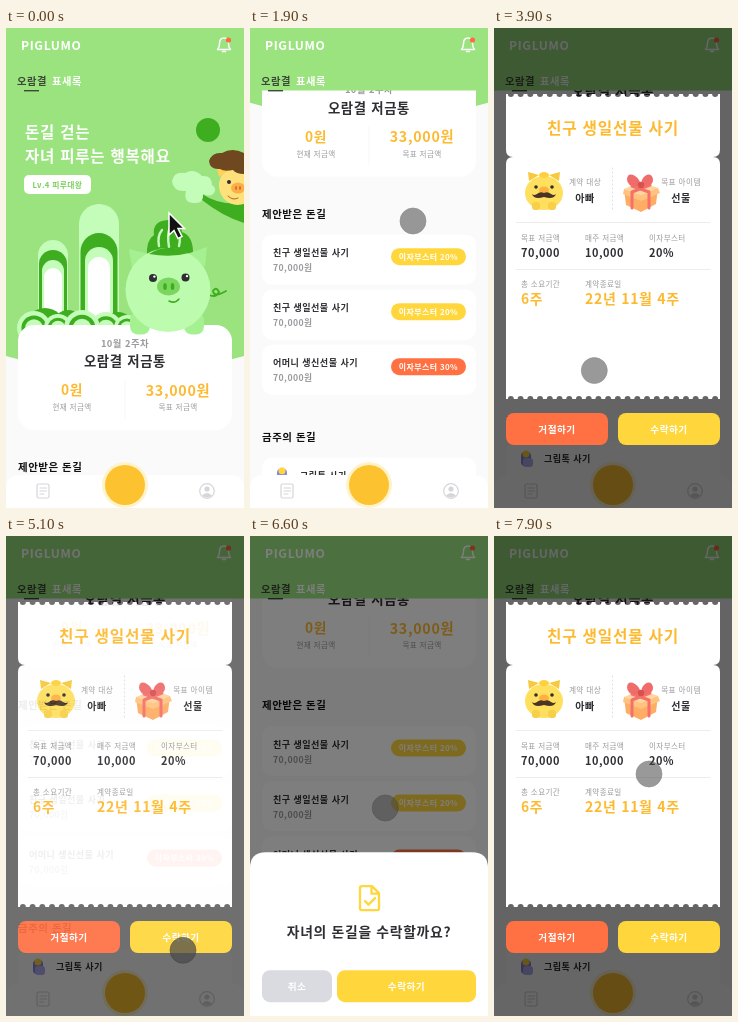
These frames come from a looping animation (238x480 px, 8000 ms). An HTML page:

```html
<!DOCTYPE html>
<html lang="ko">
<head>
<meta charset="utf-8">
<title>저금통</title>
<style>
  html, body { margin: 0; width: 100%; height: 100%; overflow: hidden; background: #fafafb; }
  svg { display: block; width: 100vw; height: 100vh; }
  text { font-family: "Noto Sans CJK KR", "Noto Sans CJK", "Noto Sans", sans-serif; letter-spacing: .05em; }
</style>
</head>
<body>
<svg id="stage" viewBox="0 0 238 480"></svg>
<script>
const LOOP = 8000;
const GREEN = '#9ae37f', DARK = '#3eae20', MINT = '#c4fdb9', YELLOW = '#ffd73c',
      GOLD = '#fdba30', ORANGE = '#ff7043', INK = '#2e2e33', GRAY = '#9a9a9e', ICON = '#d6d6da';

// ---- drawing helpers; text is placed by its vertical centre ----
const text = (x, y, size, fill, str, anchor = 'start', weight = 700) =>
  `<text x="${x}" y="${y + .4 + size * .34}" font-size="${size * .935}" fill="${fill}" text-anchor="${anchor}" font-weight="${weight}">${str}</text>`;
const mid = (x, y, size, fill, str, weight) => text(x, y, size, fill, str, 'middle', weight);
const rect = (x, y, w, h, r, fill) =>
  `<rect x="${x}" y="${y}" width="${w}" height="${h}" rx="${r}" fill="${fill}"/>`;
const oval = (x, y, rx, ry, fill, turn = 0) =>
  `<ellipse cx="${x}" cy="${y}" rx="${rx}" ry="${ry}" fill="${fill}" transform="rotate(${turn} ${x} ${y})"/>`;
const dot = (x, y, r, fill) => oval(x, y, r, r, fill);
const shape = (d, fill) => `<path d="${d}" fill="${fill}"/>`;
const line = (d, stroke, width = 1, extra = '') =>
  `<path d="${d}" fill="none" stroke="${stroke}" stroke-width="${width}" stroke-linecap="round" stroke-linejoin="round" ${extra}/>`;
const arch = (cx, top, half, fill) =>
  shape(`M${cx - half} 302V${top + half}a${half} ${half} 0 0 1 ${2 * half} 0V302z`, fill);
const group = (id, body) => `<g id="${id}">${body}</g>`;

function mound(x, r) {
  return dot(x, 300, r, MINT) + dot(x, 300, r * .74, DARK) + dot(x, 300, r * .52, MINT);
}

function scenery() {
  return arch(47, 212, 15, MINT) + arch(47, 222, 14, DARK) + arch(47, 232, 11, MINT) + arch(47, 240, 9, '#fff')
    + arch(93, 176, 20, MINT) + arch(93, 205, 18.5, DARK) + arch(93, 219, 14, MINT) + arch(93, 229, 11, '#fff')
    + dot(39, 300, 20, DARK) + dot(62, 296, 14, DARK) + dot(112, 300, 16, DARK)
    + mound(28, 17) + mound(52, 14) + mound(100, 16) + mound(121, 13) + mound(76, 18);
}

function visitor() {
  return shape('M196 166Q214 178 238 175V195Q216 188 196 172z', DARK)
    + dot(202, 102, 12, DARK)
    + shape('M166 153q2-10 13-8q9-5 17 3q10-1 10 9q6 4 1 9q-3 3-10 0q1 10-9 9q-11 0-8-12q-13 1-14-10z', MINT)
    + oval(231, 158, 18, 19, '#ffe17c', -12)
    + shape('M213 149l-3-12l12 6z', '#ffd05a')
    + shape('M203 133q3-9 13-8q10-6 22 0V146q-8 0-11-4q-9 2-13-1q-10 1-11-8z', '#70481f')
    + dot(223, 154, 2, INK) + oval(232, 160, 7, 5.5, '#ffad4a')
    + oval(230, 160, 1, 2, '#c87522') + oval(234, 160, 1, 2, '#c87522')
    + line('M222 168q5 5 10 2', '#a86725');
}

function pig() {
  return line('M203 267q7 3 10-3q-3-6-6-1q1 7 13 0', DARK, 1.8)
    + shape('M141 228q-1-16 7-21q-2-14 14-15q13 0 14 12q12 4 11 24z', DARK)
    + line('M153 218q-2-10 3-16M163 219q-2-12 1-20M173 218q2-8-1-14', MINT, 2.4)
    + rect(124, 284, 20, 22.500, 8, '#a5f091') + rect(178, 284, 20, 22.500, 8, '#a5f091')
    + shape('M126 240l-3-19l20 5zM199 239l2-20l-20 7z', '#a5f091')
    + oval(162, 262, 42.5, 42, '#bdfbae')
    + shape('M143 226q19-12 40-1q-18 5-40 1z', DARK)
    + dot(147, 250, 4, INK) + dot(179.5, 249.5, 4, INK)
    + dot(148.4, 248.6, 1.2, '#fff') + dot(181, 248.1, 1.2, '#fff')
    + oval(162.5, 258.5, 11.5, 9, '#7bd660')
    + oval(159, 258.5, 1.8, 3.6, DARK) + oval(166.5, 258.5, 1.8, 3.6, DARK)
    + line('M163 273q6 3 10-2', DARK, 1.5);
}

function offer(top, name, rate, color) {
  return rect(12, top, 214, 50, 10, '#fff')
    + text(23, top + 18, 9.7, INK, name) + text(23, top + 33, 9.3, GRAY, '70,000원')
    + rect(141, top + 13.5, 75, 17, 8.5, color) + mid(178.5, top + 22, 8.5, '#fff', `이자부스터 ${rate}%`);
}

function page() {
  return shape('M0 0H238V328Q119 362 0 328z', GREEN)
    + text(19, 104, 16.6, '#fff', '돈길 걷는') + text(19, 128, 16.6, '#fff', '자녀 피루는 행복해요')
    + rect(18, 147, 67, 19, 5, '#fff') + mid(51.5, 156.5, 8.3, '#79cf5b', 'Lv.4 피루대왕')
    + scenery() + visitor()
    + rect(12, 297, 214, 105, 16, '#fff') + pig()
    + mid(119, 315, 10, GRAY, '10월 2주차') + mid(119, 333, 14.3, INK, '오람결 저금통')
    + line('M119 352V390', '#f7f7f9')
    + mid(66, 362, 14.7, GOLD, '0원') + mid(172, 362, 15.2, GOLD, '33,000원')
    + mid(66, 379, 8.1, GRAY, '현재 저금액', 400) + mid(172, 379, 8.1, GRAY, '목표 저금액', 400)
    + text(12, 439, 11.2, '#111', '제안받은 돈길')
    + offer(460, '친구 생일선물 사기', 20, YELLOW)
    + offer(515, '친구 생일선물 사기', 20, YELLOW)
    + offer(570, '어머니 생신선물 사기', 30, ORANGE)
    + text(12, 662, 11.2, '#111', '금주의 돈길')
    + rect(12, 683, 214, 90, 10, '#fff')
    + rect(27, 694, 10, 14, 4, '#8a83df') + rect(29, 700, 10, 9, 3, '#b3adf2')
    + dot(32, 696, 3.5, YELLOW) + text(50, 700.5, 9.7, INK, '그립톡 사기');
}

function header() {
  return rect(0, 0, 238, 62.5, 0, GREEN)
    + text(15, 17, 13, '#fff', 'PIGLUMO')
    + line('M211.5 21.5h13q-2-2-2-6q0-5.500-4.500-5.500t-4.500 5.500q0 4-2 6zM216.500 23.500h3', '#fff', 1.5)
    + dot(222.5, 12, 2.6, '#ff6a45')
    + text(11, 52.5, 11, '#3c4a37', '오람결') + text(46, 52.5, 11, '#fff', '표새록')
    + rect(18, 62, 15, 1.4, 0, '#3c4a37');
}

function tabs() {
  return shape('M0 480V461q0-14 14-14H224q14 0 14 14V480z', '#fff')
    + line('M32.500 456h9q1.500 0 1.500 1.500v11q0 1.500-1.500 1.500h-9q-1.500 0-1.500-1.500v-11q0-1.500 1.500-1.500zM34 460h6.500M34 463h6.500M34 466h4', ICON, 1.2)
    + `<circle cx="201" cy="463" r="7.300" fill="none" stroke="${ICON}" stroke-width="1.200"/>`
    + dot(201, 461, 2.6, ICON) + shape('M196 467.500q5-5 10 0q-5 4-10 0z', ICON)
    + dot(119, 457, 23, '#fff3c9') + dot(119, 457, 20, '#fdc22f');
}

function dadPig() {
  return shape('M35 153l-1-9l11 3zM65 153l1-9l-11 3z', '#f7c93e')
    + oval(50, 165, 19, 17, '#ffe05e') + rect(38, 174, 8, 8, 3, '#f7cf48') + rect(54, 174, 8, 8, 3, '#f7cf48')
    + oval(50, 147, 5, 3, '#ffd03e')
    + dot(42, 159, 1.8, INK) + dot(58, 159, 1.8, INK) + oval(50, 162, 5, 3.5, '#ffb041')
    + shape('M50 165q-4-2-7 1q-3 2-5 0q2 6 12 3q10 3 12-3q-2 2-5 0q-3-3-7-1z', '#4a3524');
}

function gift() {
  return shape('M130 161l17 6v17l-15-7zM164 160l-17 7v17l15-8z', '#ffad64')
    + shape('M147 167l17-7l2 5l-19 8l-18-7l1-5z', '#ffc37f')
    + shape('M130 161l17-7l17 6l-17 7z', '#ffd49d')
    + line('M138 158l17 6v16M156 157l-18 7v16', '#f4716b', 3)
    + shape('M147 158q-14 2-14-7q1-7 8-3q5 3 6 10zM147 158q13 1 12-7q-2-7-8-3q-4 3-4 10z', '#ef6c6b')
    + dot(147, 157, 3.2, '#d9514f');
}

function contract() {
  const teeth = 22, gap = 214 / teeth - 6;
  const edge = (dir, sweep) => `h${dir * gap / 2}a3 3 0 0 ${sweep} ${dir * 6} 0h${dir * gap / 2}`.repeat(teeth);
  const field = (x, y, label, value, size = 11.7, color = INK) =>
    text(x, y, 8.1, GRAY, label, 'start', 400) + text(x, y + 15, size, color, value);
  return shape(`M12 66${edge(1, 0)}V122q0 7-7 7H19q-7 0-7-7z`, '#fff')
    + shape(`M19 129H219q7 0 7 7V371${edge(-1, 0)}V136q0-7 7-7z`, '#fff')
    + mid(119, 100, 16.8, GOLD, '친구 생일선물 사기')
    + dadPig() + gift()
    + mid(91, 153.5, 8.2, GRAY, '계약 대상', 400) + mid(91, 170, 10.7, INK, '아빠')
    + mid(187, 153.5, 8.2, GRAY, '목표 아이템', 400) + mid(187, 170, 10.7, INK, '선물')
    + line('M118.500 140V182', '#dedee2', 1, 'stroke-dasharray="1 3"')
    + line('M22 194.500H216M22 241.500H216', '#ededf0')
    + field(27, 209.5, '목표 저금액', '70,000') + field(91, 209.5, '매주 저금액', '10,000') + field(155, 209.5, '이자부스터', '20%')
    + field(27, 255.5, '총 소요기간', '6주', 14.7, GOLD) + field(91, 255.5, '계약종료일', '22년 11월 4주', 15, GOLD)
    + rect(12, 385, 102, 32, 8, ORANGE) + mid(63, 401, 10.3, '#fff', '거절하기')
    + rect(124, 385, 102, 32, 8, YELLOW) + mid(175, 401, 10.3, '#fff', '수락하기');
}

function sheet() {
  return shape('M0 200V16Q0 0 16 0H222q16 0 16 16V200z', '#fff')
    + line('M110 36q0-2 2-2h10l7 7v15q0 2-2 2h-15q-2 0-2-2zM121.500 34.500v7h7M115 49l3.500 3.500l6.500-6.500', YELLOW, 2.3)
    + mid(119, 79, 14.8, INK, '자녀의 돈길을 수락할까요?')
    + rect(12, 118, 70, 32, 8, '#dadae1') + mid(47, 134, 10.3, '#fff', '취소')
    + rect(87, 118, 139, 32, 8, YELLOW) + mid(156.5, 134, 10.3, '#fff', '수락하기');
}

const SHADE = rect(0, 0, 238, 480, 0, '#000');
const stage = document.getElementById('stage');
stage.innerHTML = group('page', page()) + group('header', header()) + group('tabs', tabs())
  + group('sheetShade', SHADE)
  + group('dialog', `<g opacity=".6">${SHADE}</g>` + group('contract', contract()))
  + group('sheet', sheet())
  + group('touch', '<circle r="13" fill="#4a4a4a" stroke="#333" stroke-opacity=".6"/>')
  + group('arrow', '<path d="M163 185V207l5-4.500l4 8l4-2l-4-8h6.500z" fill="#111" stroke="#fff" stroke-width="1.500"/>');
const part = Object.fromEntries([...stage.querySelectorAll('g[id]')].map(g => [g.id, g]));

// ---- motion ----
const ramp = (t, from, to) => Math.min(1, Math.max(0, (t - from) / (to - from)));
const easeOut = (u, power = 3) => 1 - (1 - u) ** power;
const within = (t, from, to) => t >= from && t < to;

// time, x, y
const touchPath = [
  [100, 163, 191], [500, 163, 193], [2050, 163, 193], [2480, 154, 310], [2600, 136, 226], [2800, 136, 230],
  [3100, 136, 230], [3800, 130, 315], [4050, 47, 392], [4300, 206, 422], [4500, 177, 415],
  [6000, 177, 413], [6450, 136, 272], [6800, 134, 272], [7100, 128, 282], [7500, 155, 238], [8000, 155, 238]
];

function touchAt(t) {
  const i = Math.max(1, touchPath.findIndex(p => p[0] > t));
  const [t0, x0, y0] = touchPath[i - 1], [t1, x1, y1] = touchPath[i];
  const u = ramp(t, t0, t1), s = u * u * (3 - 2 * u);
  return [x0 + (x1 - x0) * s, y0 + (y1 - y0) * s];
}

function draw(t) {
  const scroll = 270 * easeOut(ramp(t, 750, 2500), 2.6);
  part.page.setAttribute('transform', `translate(0 ${-scroll})`);

  // The backdrop and the contract fade as one layer.
  const opened = t < 6000 ? ramp(t, 2950, 3150) : ramp(t, 7650, 7850);
  const shown = t < 6000 ? opened - ramp(t, 5085, 5300) : opened;
  part.contract.setAttribute('transform', `translate(0 ${57 * (1 - opened)})`);
  part.dialog.setAttribute('opacity', shown);

  const closing = ramp(t, 6550, 7000);
  const raised = easeOut(ramp(t, 5400, 5920)) * (1 - closing ** 2);
  part.sheet.setAttribute('transform', `translate(0 ${480 - 166 * raised})`);
  part.sheetShade.setAttribute('opacity', .57 * ramp(t, 5150, 5400) * (1 - closing));

  const pressed = within(t, 2800, 2950) || within(t, 5000, 5200) || within(t, 6500, 6600) || within(t, 7580, 7700);
  part.touch.setAttribute('transform', `translate(${touchAt(t)})`);
  part.touch.setAttribute('opacity', t < 100 ? 0 : pressed ? .72 : .56);
  part.arrow.setAttribute('opacity', t < 100 ? 1 : 0);
}

const start = performance.now();
function tick() {
  draw((performance.now() - start) % LOOP);
  requestAnimationFrame(tick);
}
tick();
</script>
</body>
</html>
```
